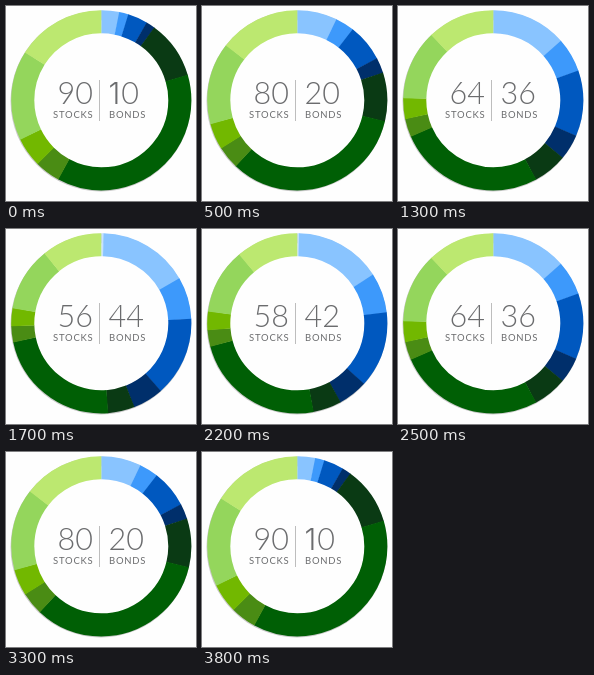
Write an HTML page that moves like this. It is 190 by 195 pixels and loops after 4.3 s.

```html
<!DOCTYPE html>
<html lang="en">
<head>
<meta charset="utf-8">
<title>Stock and bond mix</title>
<style>
  html, body { margin: 0; width: 100%; height: 100%; overflow: hidden; background: #fefefe; }
  svg { display: block; width: 190px; height: 195px; }
  text { font-family: Lato, "Open Sans", sans-serif; fill: #6b6c6e; }
  .number { font-size: 30.5px; font-weight: 300; }
  .label { font-size: 9.5px; letter-spacing: .78px; }
  .one { font-family: Inter, sans-serif; font-size: 30px; letter-spacing: 1px; }
  #ring circle { fill: none; stroke-width: 23.1; }
</style>
</head>
<body>
<svg viewBox="0 0 190 195">
  <defs>
    <filter id="soft"><feGaussianBlur stdDeviation=".7"/></filter>
  </defs>
  <circle cx="94.9" cy="95.1" r="90.4" fill="#c9c9c9" filter="url(#soft)"/>
  <circle cx="95.3" cy="94.3" r="80" fill="#fefefe"/>
  <g id="ring" transform="rotate(-90 95.3 94.3)"></g>
  <path d="M93.5 74V115" stroke="#bdbdbd"/>
  <text id="stocks" class="number" x="87" y="98.3" text-anchor="end"></text>
  <text id="bonds" class="number" x="102.5" y="98.3"></text>
  <text class="label" x="47" y="112">STOCKS</text>
  <text class="label" x="103" y="112">BONDS</text>
</svg>
<script>
  const LOOP = 4300, STEP = 100, STEPS = 17, BACK = 2100;
  const MIN = 10, MAX = 44;

  // Each slice's end angle in degrees at the smallest and largest bond share
  const slices = [
    { color: '#c6e2ff', from: -6, to: 1.5 },
    { color: '#89c4ff', from: 11.5, to: 60 },
    { color: '#3d99fb', from: 17.5, to: 87 },
    { color: '#0058bf', from: 30.3, to: 138.6 },
    { color: '#002f6b', from: 36, to: 158.4 },
    { color: '#0a3a14', from: 73.5, to: 175.5 },
    { color: '#005f05', from: 208.5, to: 257.7 },
    { color: '#4a8c14', from: 225, to: 268 },
    { color: '#72b800', from: 244, to: 279.7 },
    { color: '#94d65c', from: 302, to: 320.8 },
    { color: '#bce870', from: 360, to: 360 }
  ];

  const byId = id => document.getElementById(id);

  for (const slice of slices) {
    slice.arc = document.createElementNS('http://www.w3.org/2000/svg', 'circle');
    const attrs = { cx: 95.3, cy: 94.3, r: 78.55, pathLength: 360, stroke: slice.color };
    for (const key in attrs) slice.arc.setAttribute(key, attrs[key]);
    byId('ring').append(slice.arc);
  }

  function draw(bonds) {
    const k = (bonds - MIN) / (MAX - MIN);
    let start = 0;
    for (const { arc, from, to } of slices) {
      const end = Math.max(0, from + (to - from) * k);
      // A slight overlap hides the seams
      arc.setAttribute('stroke-dasharray', `${end - start + .3} 360`);
      arc.setAttribute('stroke-dashoffset', -start);
      start = end;
    }
    byId('stocks').textContent = 100 - bonds;
    byId('bonds').innerHTML = String(bonds).replace('1', '<tspan class="one">1</tspan>');
  }

  // Climb in even steps, hold, then step back down and hold
  function bondsAt(time) {
    const t = time % LOOP;
    const stepsSince = from => Math.max(0, Math.min(STEPS, Math.floor((t - from) / STEP)));
    return MIN + (MAX - MIN) / STEPS * (stepsSince(0) - stepsSince(BACK));
  }

  let shown;
  function tick() {
    const bonds = bondsAt(performance.now());
    if (bonds !== shown) draw(shown = bonds);
    requestAnimationFrame(tick);
  }
  tick();
</script>
</body>
</html>
```
